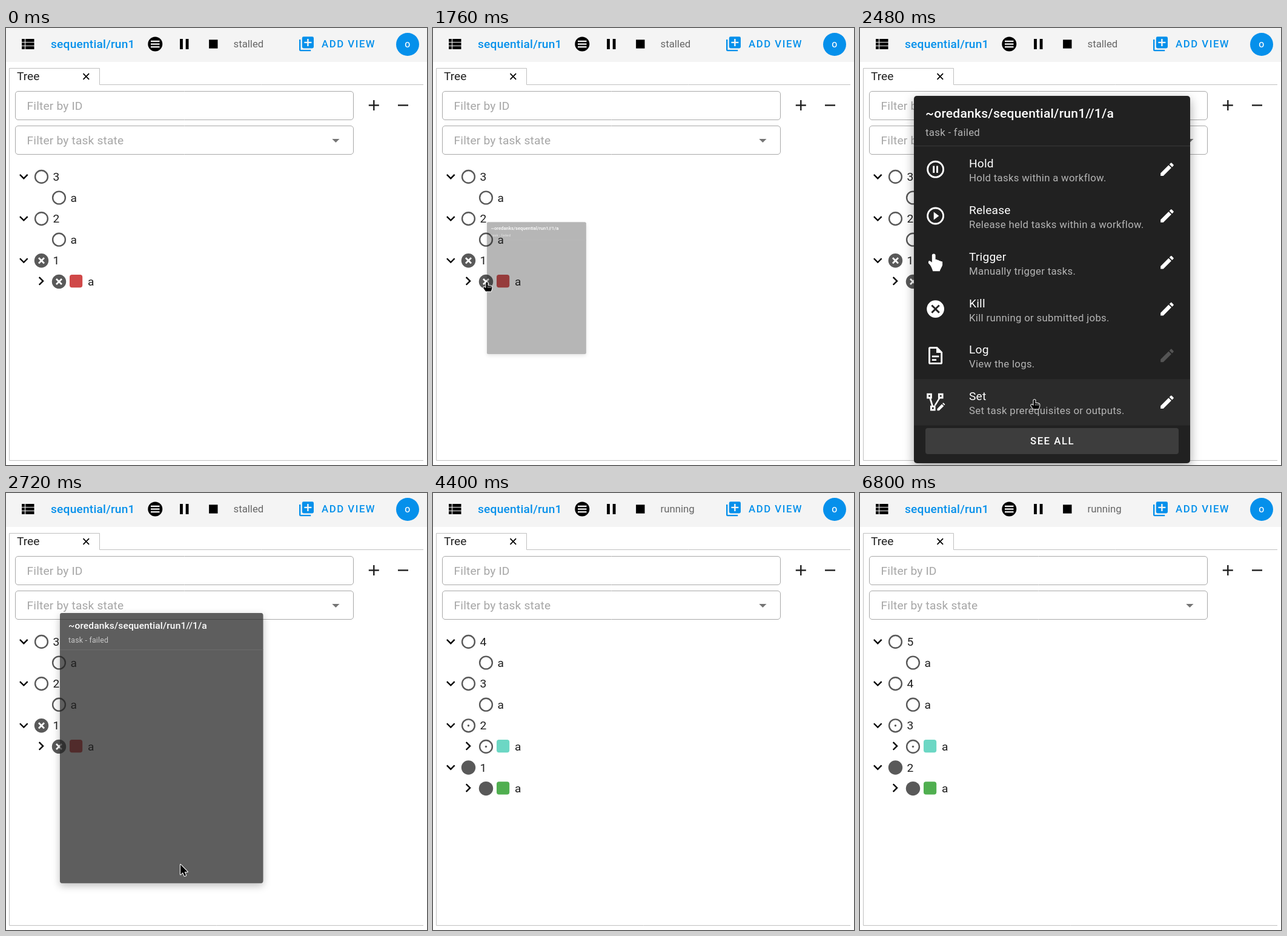
An HTML page with a canvas that plays this animation: 695 by 721 pixels, repeating every 7600 ms.

```html
<!DOCTYPE html>
<html lang="en">
<head>
<meta charset="utf-8">
<title>Workflow tree</title>
<style>
  html, body { margin: 0; width: 100%; height: 100%; overflow: hidden; background: #fff; }
  canvas { display: block; }
</style>
</head>
<body>
<canvas id="stage" width="695" height="721"></canvas>
<script>
const LOOP = 7600, STEP = 40;
const BLUE = '#0590eb', GREY = '#595959', INK = '#1f1f1f';
const JOB = { failed: '#d04848', submitted: '#6cd7c4', running: '#6aa4f1', succeeded: '#50af50' };

const stage = document.getElementById('stage');
const main = stage.getContext('2d');
const layer = document.createElement('canvas');
layer.width = stage.width;
layer.height = stage.height;
const menuCtx = layer.getContext('2d');
let g = main;

// 24-unit icon shapes
const ICON = {
  list: 'M9,5V9H21V5M9,19H21V15H9M9,14H21V10H9M4,9H8V5H4M4,19H8V15H4M4,14H8V10H4V14Z',
  pause: 'M14,19H18V5H14M6,19H10V5H6V19Z',
  stop: 'M18,18H6V6H18V18Z',
  addView: 'M19,11H15V15H13V11H9V9H13V5H15V9H19M20,2H8A2,2 0 0,0 6,4V16A2,2 0 0,0 8,18H20A2,2 0 0,0 22,16V4A2,2 0 0,0 20,2M4,6H2V20A2,2 0 0,0 4,22H18V20H4V6Z',
  down: 'M7.41,8.58L12,13.17L16.59,8.58L18,10L12,16L6,10L7.41,8.58Z',
  right: 'M8.59,16.58L13.17,12L8.59,7.41L10,6L16,12L10,18L8.59,16.58Z',
  hold: 'M13,16V8H15V16H13M9,16V8H11V16H9M12,2A10,10 0 0,1 12,22A10,10 0 0,1 12,2M12,4A8,8 0 0,0 12,20A8,8 0 0,0 12,4Z',
  release: 'M12,2A10,10 0 0,1 12,22A10,10 0 0,1 12,2M12,4A8,8 0 0,0 12,20A8,8 0 0,0 12,4M10,16.5L16,12L10,7.5V16.5Z',
  trigger: 'M10,2A2,2 0 0,1 12,4V8.5C12,8.5 14,8.25 14,9.25C14,9.25 16,9 16,10C16,10 18,9.75 18,10.75C18,10.75 20,10.5 20,11.5V15C20,16 17,21 17,22H9C9,22 7,15 4,13C4,13 3,7 8,12V4A2,2 0 0,1 10,2Z',
  kill: 'M12,2A10,10 0 0,1 12,22A10,10 0 0,1 12,2M15.59,7L12,10.59L8.41,7L7,8.41L10.59,12L7,15.59L8.41,17L12,13.41L15.59,17L17,15.59L13.41,12L17,8.41L15.59,7Z',
  log: 'M6,2A2,2 0 0,0 4,4V20A2,2 0 0,0 6,22H18A2,2 0 0,0 20,20V8L14,2H6M6,4H13V9H18V20H6V4M8,12V14H16V12H8M8,16V18H13V16H8Z',
  set: 'M2,2H8V8H2ZM4,4V6H6V4ZM15,2H21V8H15ZM17,4V6H19V4ZM6,16H12V22H6ZM8,18V20H10V18ZM5,8L7,8L9.4,16L7.4,16ZM15.2,8L17.2,8L12,16.5L10.6,15.5ZM14,19.6L19.3,14.3L21.5,16.5L16.2,21.8H14ZM20,13.6L21,12.7L23,14.7L22.1,15.7Z',
  pencil: 'M20.71,7.04C21.1,6.65 21.1,6 20.71,5.63L18.37,3.29C18,2.9 17.35,2.9 16.96,3.29L15.12,5.12L18.87,8.87M3,17.25V21H6.75L17.81,9.93L14.06,6.18L3,17.25Z'
};
for (const k in ICON) ICON[k] = new Path2D(ICON[k]);

const ITEMS = [
  ['hold', 'Hold', 'Hold tasks within a workflow.'],
  ['release', 'Release', 'Release held tasks within a workflow.'],
  ['trigger', 'Trigger', 'Manually trigger tasks.'],
  ['kill', 'Kill', 'Kill running or submitted jobs.'],
  ['log', 'Log', 'View the logs.'],
  ['set', 'Set', 'Set task prerequisites or outputs.']
];

// start time, then cycles as "number:state:job"
const TREE = [
  [0, '3:wait 2:wait 1:fail:failed'],
  [3440, '4:wait 3:wait 2:wait 1:fail:failed'],
  [3480, '4:wait 3:wait 2:wait 1:done:failed'],
  [3680, '4:wait 3:wait 2:dot 1:done:succeeded'],
  [4200, '4:wait 3:wait 2:dot:submitted 1:done:succeeded'],
  [5200, '4:wait 3:wait 2:run:running 1:done:succeeded'],
  [5840, '4:wait 3:wait 2:done:succeeded'],
  [6200, '5:wait 4:wait 3:wait 2:done:succeeded'],
  [6320, '5:wait 4:wait 3:dot 2:done:succeeded'],
  [6680, '5:wait 4:wait 3:dot:submitted 2:done:succeeded']
];

const clamp = v => Math.min(1, Math.max(0, v));
const mix = (a, b, p) => a + (b - a) * p;
const smooth = p => p * p * (3 - 2 * p);

function bezier(x1, y1, x2, y2) {
  const at = (a, b, u) => 3 * (1 - u) * (1 - u) * u * a + 3 * (1 - u) * u * u * b + u * u * u;
  return x => {
    let lo = 0, hi = 1;
    for (let i = 0; i < 24; i++) {
      const mid = (lo + hi) / 2;
      if (at(x1, x2, mid) < x) lo = mid; else hi = mid;
    }
    return at(y1, y2, lo);
  };
}
const decelerate = bezier(0, 0, 0.2, 1);
const accelerate = bezier(0.4, 0, 1, 1);
const standard = bezier(0.4, 0, 0.2, 1);

function text(str, x, y, size, color, spacing = 0, weight = 400) {
  g.font = `${weight} ${size}px Roboto, sans-serif`;
  g.letterSpacing = spacing + 'px';
  g.fillStyle = color;
  g.fillText(str, x, y);
}

function icon(name, x, y, color, scale = 1.2) {
  g.save();
  g.translate(x - 12 * scale, y - 12 * scale);
  g.scale(scale, scale);
  g.fillStyle = color;
  g.fill(ICON[name], 'evenodd');
  g.restore();
}

function rect(x, y, w, h, color) {
  g.fillStyle = color;
  g.fillRect(x, y, w, h);
}

function round(x, y, w, h, r) {
  g.beginPath();
  g.roundRect(x, y, w, h, r);
}

function disc(x, y, r, color) {
  g.fillStyle = color;
  g.beginPath();
  g.arc(x, y, r, 0, 7);
  g.fill();
}

function cross(x, y, r, width, color) {
  g.strokeStyle = color;
  g.lineWidth = width;
  g.beginPath();
  g.moveTo(x - r, y - r);
  g.lineTo(x + r, y + r);
  g.moveTo(x + r, y - r);
  g.lineTo(x - r, y + r);
  g.stroke();
}

function toolbar(t) {
  rect(0, 0, 695, 56, '#f4f4f4');
  icon('list', 35.7, 26.5, '#000');
  text('sequential/run1', 74, 33, 19.2, BLUE, 0.18, 500);
  disc(246.3, 26.5, 12, '#000');
  for (let i = -1; i < 2; i++) rect(239, 25.4 + i * 4.7, 14.5, 2.3, '#f4f4f4');
  icon('pause', 294.3, 26.5, '#000');
  icon('stop', 342.3, 26.5, '#000');
  text(t < 4200 ? 'stalled' : 'running', 375.5, 32, 16.8, '#666');
  icon('addView', 496, 26.3, BLUE);
  text('ADD VIEW', 521, 32.3, 16.8, BLUE, 1.5, 500);
  disc(663, 27, 19, BLUE);
  text('O', 658.3, 31.5, 13, '#fff', 0, 500);
}

function panel() {
  g.strokeStyle = '#c0c0c0';
  g.lineWidth = 1;
  g.beginPath();
  g.moveTo(689, 713.5);
  g.lineTo(5.5, 713.5);
  g.lineTo(5.5, 66.5);
  g.lineTo(154.5, 66.5);
  g.lineTo(154.5, 93.5);
  g.lineTo(689, 93.5);
  g.stroke();
  text('Tree', 18, 86, 19.2, INK);
  cross(132.3, 80, 4.8, 1.8, '#000');

  ['Filter by ID', 'Filter by task state'].forEach((label, i) => {
    const y = 104.5 + i * 57;
    g.strokeStyle = '#a8a8a8';
    g.lineWidth = 1;
    round(15.5, y, 558, 47, 4.5);
    g.stroke();
    text(label, 34.5, y + 30, 19.2, '#a6a6a6', 0.18);
  });
  g.fillStyle = '#757575';
  g.beginPath();
  g.moveTo(538.3, 183);
  g.lineTo(550.5, 183);
  g.lineTo(544.4, 189);
  g.fill();
  rect(598.8, 126.3, 17, 2.4, INK);
  rect(606.1, 119, 2.4, 17, INK);
  rect(647, 126.3, 17, 2.4, INK);
}

function taskIcon(x, y, state, t) {
  if (state === 'done' || state === 'fail') {
    disc(x, y, 11.7, GREY);
    if (state === 'fail') cross(x, y, 4.5, 2.8, '#fff');
    return;
  }
  g.strokeStyle = GREY;
  g.lineWidth = 2.4;
  g.beginPath();
  g.arc(x, y, 10.4, 0, 7);
  g.stroke();
  if (state === 'wait') return;
  disc(x, y, 1.7, GREY);
  if (state === 'run') {
    g.beginPath();
    g.moveTo(x, y);
    g.arc(x, y, 6.5, -Math.PI / 2, -Math.PI / 2 + clamp((t - 5200) / 640) * Math.PI * 2);
    g.fill();
  }
}

function tree(t) {
  const rows = TREE.filter(s => s[0] <= t).pop()[1].split(' ');
  rows.forEach((row, i) => {
    const [num, state, job] = row.split(':');
    const y = 245.4 + i * 69.2, ya = y + 34.6;
    icon('down', 29.3, y - 0.3, '#000');
    taskIcon(58.5, y, state, t);
    text(num, 77.5, y + 6.6, 19.2, INK);
    taskIcon(87.5, ya, state, t);
    if (job) {
      icon('right', 58, ya - 1.5 + 0.5, '#000');
      g.fillStyle = JOB[job];
      round(105, ya - 11.4, 21.2, 21.2, 4);
      g.fill();
    }
    text('a', job ? 135 : 106.5, ya + 6.6, 19.2, INK);
  });
}

function menuList(hover) {
  ITEMS.forEach(([name, title, note], i) => {
    const y = 233.2 + i * 76.8;
    if (i === hover) rect(89, y - 38, 456, 76.5, '#2b2b2b');
    icon(name, 124.6, y, '#fff', 1.44);
    text(title, 180, y - 3, 19.2, '#fff', 0.18);
    text(note, 180, y + 20, 16.8, '#b4b4b4', 0.3);
    icon('pencil', 507, y, name === 'log' ? '#545454' : '#fff');
  });
  g.fillStyle = '#3d3d3d';
  round(108, 660, 418, 43, 4);
  g.fill();
  text('SEE ALL', 281, 687, 16.8, '#fff', 1.5, 500);
}

function menu(t, pointer) {
  const opening = t < 2640;
  const since = t - (opening ? 1740 : 2663);
  if (t < 1740 || since >= 125 && !opening) return;
  const p = opening ? decelerate(clamp(since / 183)) : 1 - accelerate(clamp(since / 125));
  const list = opening ? standard(clamp((since - 150) / 300)) : 1 - standard(clamp(since / 60));
  const s = mix(0.05, 1, p);
  const x = 89, y = mix(437, 112, s), w = 456 * s, h = 606 * s;

  // shadow outside the card only
  main.save();
  main.beginPath();
  main.rect(0, 0, 695, 721);
  main.roundRect(x, y, w, h, 5 * s);
  main.clip('evenodd');
  main.globalAlpha = p;
  main.shadowColor = 'rgba(0,0,0,0.36)';
  main.shadowBlur = 17 * s;
  main.shadowOffsetY = 6 * s;
  main.fillStyle = '#212121';
  round(x, y, w, h, 5 * s);
  main.fill();
  main.restore();

  g = menuCtx;
  g.clearRect(0, 0, 695, 721);
  g.save();
  g.translate(89, 437);
  g.scale(s, s);
  g.translate(-89, -437);
  g.fillStyle = '#212121';
  round(89, 112, 456, 606, 5);
  g.fill();
  text('~oredanks/sequential/run1//1/a', 108, 148, 21.1, '#fff', 0.2, 500);
  text('task - failed', 108, 178, 16.8, '#b4b4b4', 0.3);
  rect(89, 194, 456, 1.2, '#373737');
  g.globalAlpha = list;
  if (list > 0) menuList(Math.floor((pointer.y - 195) / 76.8));
  g.restore();
  g = main;
  g.globalAlpha = p;
  g.drawImage(layer, 0, 0);
  g.globalAlpha = 1;
}

// time, x, y; the pointer eases between stops
const PATH = [
  [480, 276, 706], [600, 192, 588], [720, 192, 588], [760, 198, 585], [880, 198, 585],
  [1640, 89, 419], [1920, 89, 419], [2440, 288, 613], [2800, 288, 613], [2960, 272, 740]
];

function pointerAt(t) {
  const i = PATH.findIndex(s => s[0] > t);
  if (i < 1) return null;
  const [t0, x0, y0] = PATH[i - 1], [t1, x1, y1] = PATH[i];
  const p = smooth((t - t0) / (t1 - t0));
  const y = Math.round(mix(y0, y1, p));
  return { x: Math.round(mix(x0, x1, p)), y, hand: t > 1000 && t < 2700 && (t > 1640 || y < 436) };
}

const ARROW = new Path2D('M0,0V16.5L4,13L6.6,19L9.2,18L6.6,12H11.8Z');
const HAND = new Path2D('M-1.5,1.2Q0,-0.6 1.5,1.2V6H4Q7.5,6.2 8.3,8V11L6.8,15.5H-2L-5.6,10.5Q-6,8 -3.8,8.4L-1.5,10Z');

function drawPointer({ x, y, hand }) {
  g.save();
  g.translate(x, y);
  g.lineJoin = 'round';
  g.lineWidth = 2;
  g.strokeStyle = '#fff';
  g.fillStyle = '#000';
  const shape = hand ? HAND : ARROW;
  g.stroke(shape);
  g.fill(shape);
  if (hand) for (let i = 0; i < 3; i++) rect(1.5 + i * 2.2, 7, 0.7, 3, '#fff');
  g.restore();
}

function draw(t) {
  rect(0, 0, 695, 721, '#fff');
  toolbar(t);
  panel();
  tree(t);
  const pointer = pointerAt(t);
  if (pointer) {
    menu(t, pointer);
    drawPointer(pointer);
  }
}

const start = performance.now();
function tick() {
  const t = (performance.now() - start) % LOOP;
  draw(Math.floor(t / STEP) * STEP);
  requestAnimationFrame(tick);
}
tick();
</script>
</body>
</html>
```
